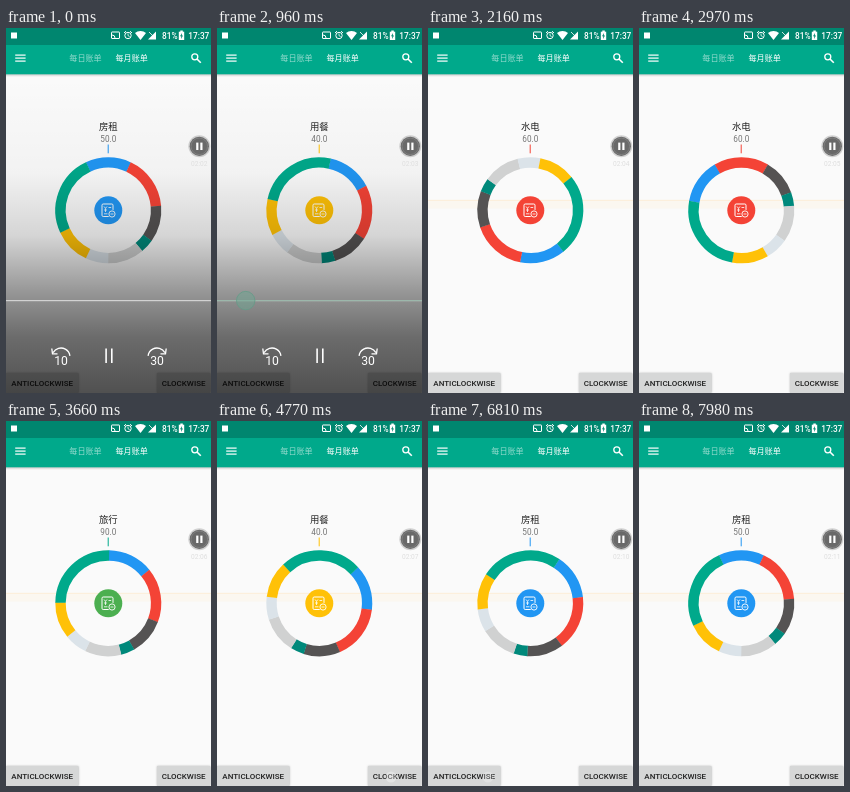
An HTML page with a canvas for the animation above (8 s loop, 205 by 365 pixels).

```html
<!DOCTYPE html>
<html lang="zh-CN">
<head>
<meta charset="utf-8">
<style>
  html, body { margin: 0; width: 100%; height: 100%; overflow: hidden; background: #fafafa; }
  canvas { display: block; width: 205px; height: 365px; }
</style>
</head>
<body>
<canvas></canvas>
<script>
const W = 205, H = 365, LOOP = 8000;
const canvas = document.querySelector('canvas');
const c = canvas.getContext('2d');
const dpr = window.devicePixelRatio || 1;
canvas.width = W * dpr;
canvas.height = H * dpr;

const LATIN = 'Roboto, sans-serif';
const CJK = '"Noto Sans CJK SC", "Noto Sans CJK", sans-serif';
const CX = 102.3, CY = 182.3;

// Each slice spans as many degrees as its value.
const slices = [
  { value: 50, color: '#2196f3', name: '房租' },
  { value: 60, color: '#f44336', name: '水电' },
  { value: 40, color: '#555353' },
  { value: 15, color: '#00897b' },
  { value: 40, color: '#d0d1d1' },
  { value: 25, color: '#dbe3e9' },
  { value: 40, color: '#ffc107', name: '用餐' },
  { value: 90, color: '#00a98b', name: '旅行', badge: '#4caf50' }
];
let sum = 0;
for (const s of slices) { s.start = sum; sum += s.value; }

const BLUE = 0, RED = 1, YELLOW = 6, GREEN = 7;
const turns = [
  { from: 700, to: 1440, by: 135, item: YELLOW },
  { from: 1925, to: 2765, by: 170, item: RED },
  { from: 3260, to: 3935, by: 125, item: GREEN },
  { from: 4710, to: 5250, by: 65, item: YELLOW },
  { from: 5765, to: 6150, by: -65, item: GREEN },
  { from: 6690, to: 7140, by: -70, item: BLUE }
];
const taps = [
  { at: 4590, x: 174 },
  { at: 5640, x: 60 },
  { at: 6600, x: 60 }
];

const clamp = v => Math.max(0, Math.min(1, v));
const progress = (t, from, to) => clamp((t - from) / (to - from));
const ease = p => (1 - Math.cos(Math.PI * p)) / 2;

function rect(x, y, w, h, color) {
  c.fillStyle = color;
  c.fillRect(x, y, w, h);
}
function disc(x, y, r, color) {
  c.fillStyle = color;
  c.beginPath();
  c.arc(x, y, r, 0, Math.PI * 2);
  c.fill();
}
function arc(x, y, r, a, b, color, width) {
  c.strokeStyle = color;
  c.lineWidth = width;
  c.beginPath();
  c.arc(x, y, r, a, b);
  c.stroke();
}
function line(points, color, width) {
  c.strokeStyle = color;
  c.lineWidth = width;
  c.beginPath();
  points.forEach(([x, y]) => c.lineTo(x, y));
  c.stroke();
}
function poly(points, color) {
  c.fillStyle = color;
  c.beginPath();
  points.forEach(([x, y]) => c.lineTo(x, y));
  c.fill();
}
function box(x, y, w, h, r, color, width) {
  c.strokeStyle = color;
  c.lineWidth = width;
  c.beginPath();
  c.roundRect(x, y, w, h, r);
  c.stroke();
}
function text(str, x, y, size, color, family = LATIN, weight = 400) {
  c.font = `${weight} ${size}px ${family}`;
  c.fillStyle = color;
  c.textAlign = 'center';
  c.textBaseline = 'alphabetic';
  c.fillText(str, x, y);
}

function statusBar() {
  rect(0, 0, W, 17, '#00866f');
  rect(5, 4.5, 6, 6, '#fff');
  box(105.5, 4, 8, 6.5, 0.5, '#fff', 1);
  arc(106, 10, 3, -Math.PI / 2, 0, '#fff', 1);
  arc(122, 7.5, 3.2, 0, Math.PI * 2, '#fff', 1);
  line([[122, 5.5], [122, 7.7], [123.6, 8.5]], '#fff', 0.8);
  line([[118, 5], [120, 3.2]], '#fff', 1);
  line([[124, 3.2], [126, 5]], '#fff', 1);
  poly([[129, 5], [131.5, 3.5], [134.5, 3], [137.5, 3.5], [140, 5], [134.5, 12]], '#fff');
  poly([[142, 11.5], [150, 11.5], [150, 3.5]], '#fff');
  line([[143, 4], [147, 8]], '#fff', 0.8);
  text('81%', 163.8, 11, 8.3, '#fff', LATIN, 500);
  rect(174.3, 2.5, 2.5, 1.5, '#fff');
  rect(172.8, 3.7, 5.4, 8.3, '#fff');
  poly([[176, 5], [174, 8.3], [175.3, 8.3], [175, 11], [177, 7.4], [175.8, 7.4]], '#00866f');
  text('17:37', 192.8, 11, 8.3, '#fff', LATIN, 500);
}

function appBar() {
  const shade = c.createLinearGradient(0, 46, 0, 49);
  shade.addColorStop(0, 'rgba(0,0,0,.2)');
  shade.addColorStop(1, 'rgba(0,0,0,0)');
  rect(0, 46, W, 3, shade);
  rect(0, 17, W, 29.3, '#00a98b');
  for (const y of [26.5, 29.5, 32.5]) rect(9.2, y, 10.4, 1.2, '#fff');
  text('每日账单', 79.5, 33.2, 8.1, 'rgba(255,255,255,.58)', CJK);
  text('每月账单', 125.7, 33.2, 8.1, '#fff', CJK, 500);
  arc(188.8, 28.8, 3, 0, Math.PI * 2, '#fff', 1.3);
  line([[191, 31], [194.8, 34.8]], '#fff', 1.6);
}

function chart(t) {
  let angle = -25, item = BLUE;
  for (const turn of turns) {
    angle += turn.by * ease(progress(t, turn.from, turn.to));
    if (t >= turn.from) item = turn.item;
  }
  const rad = deg => (deg - 90) * Math.PI / 180;
  for (const s of slices) {
    const a = s.start + angle;
    arc(CX, CY, 47.8, rad(a), rad(a + s.value + 0.3), s.color, 10.4);
  }

  const { name, value, color, badge = color } = slices[item];
  text(name, 102.3, 102.3, 9.4, '#222', CJK);
  text(value.toFixed(1), 102.3, 114, 8.2, '#757575');
  rect(101.7, 116.5, 1, 8.8, color);
  disc(CX, CY, 14, badge);
  box(96, 176, 11, 12.5, 1.2, '#fff', 1);
  line([[98, 178.5], [99.5, 180.3], [101, 178.5]], '#fff', 0.8);
  line([[99.5, 180.3], [99.5, 184]], '#fff', 0.8);
  line([[98, 182], [101, 182]], '#fff', 0.7);
  line([[102.5, 179.5], [105.2, 179.5]], '#fff', 0.8);
  line([[98, 185.8], [101.5, 185.8]], '#fff', 0.8);
  disc(106, 186, 4.2, badge);
  arc(106, 186, 3.1, 0, Math.PI * 2, '#fff', 0.9);
  line([[104.5, 186], [107.5, 186]], '#fff', 0.8);
}

function button(label, x, w) {
  c.save();
  c.shadowColor = 'rgba(0,0,0,.3)';
  c.shadowBlur = 2 * dpr;
  c.fillStyle = '#d6d7d7';
  c.beginPath();
  c.roundRect(x, 345, w, 20, 1);
  c.fill();
  c.restore();
  text(label, x + w / 2, 357.8, 8, '#202020', LATIN, 500);
}

function recorder(t) {
  disc(193.3, 118.3, 11, 'rgba(0,0,0,.16)');
  disc(193.3, 118.3, 9.6, '#696969');
  arc(193.3, 118.3, 8.3, 0, Math.PI * 2, '#858585', 0.8);
  rect(190.2, 114.6, 2.2, 7.4, '#fff');
  rect(194.3, 114.6, 2.2, 7.4, '#fff');
  const seconds = 7 + Math.floor((t - 4080) / 870);
  text('02:' + String(seconds).padStart(2, '0'), 193.3, 138, 6.6, '#dedede');
}

function skipIcon(x, label, dir) {
  c.save();
  c.translate(x, 0);
  c.scale(dir, 1);
  arc(0, 329, 9, -Math.PI * 0.84, -Math.PI * 0.04, '#fff', 1.3);
  line([[-9.2, 320.5], [-8.5, 325.8], [-3.5, 325.8]], '#fff', 1.3);
  c.restore();
  text(label, x, 337, 12.2, '#fff');
}

function player(t) {
  const alpha = 1 - progress(t, 1470, 1900);
  if (!alpha) return;
  c.save();
  c.globalAlpha = alpha;
  const dim = c.createLinearGradient(0, 50, 0, H);
  [[0, 0], [0.3, 0.03], [0.5, 0.15], [0.68, 0.4], [0.82, 0.57], [1, 0.68]]
    .forEach(([at, a]) => dim.addColorStop(at, `rgba(0,0,0,${a})`));
  rect(0, 50, W, H - 50, dim);
  rect(0, 272, W, 1.2, 'rgba(255,255,255,.6)');

  c.globalAlpha = alpha * progress(t, 660, 800);
  rect(0, 272, W, 1.2, 'rgba(120,165,145,.6)');
  disc(28.7, 272.6, 9.5, 'rgba(110,165,145,.5)');
  arc(28.7, 272.6, 9.2, 0, Math.PI * 2, 'rgba(100,155,135,.8)', 0.9);

  c.globalAlpha = alpha;
  skipIcon(55, '10', 1);
  skipIcon(151, '30', -1);
  rect(99.3, 320.5, 1.6, 14.5, '#fff');
  rect(105, 320.5, 1.6, 14.5, '#fff');
  c.restore();
}

function tapDots(t) {
  for (const { at, x } of taps) {
    const age = t - at;
    if (age < 0 || age > 300) continue;
    const a = 0.5 * (1 - progress(age, 120, 300));
    disc(x, 356, 5.5, `rgba(255,255,255,${a})`);
  }
}

function draw(t) {
  c.setTransform(dpr, 0, 0, dpr, 0, 0);
  rect(0, 0, W, H, '#fafafa');
  c.globalAlpha = progress(t, 1470, 1900) || (t < 1470 ? 0 : 1);
  rect(0, 171.5, W, 9, '#fbf7f0');
  rect(0, 172, W, 1, '#fcefdc');
  c.globalAlpha = 1;
  statusBar();
  appBar();
  chart(t);
  button('ANTICLOCKWISE', 0, 72.5);
  button('CLOCKWISE', 151, 53.3);
  tapDots(t);
  player(t);
  recorder(t);
}

const begin = performance.now();
function frame() {
  draw((performance.now() - begin) % LOOP);
  requestAnimationFrame(frame);
}
frame();
</script>
</body>
</html>
```
